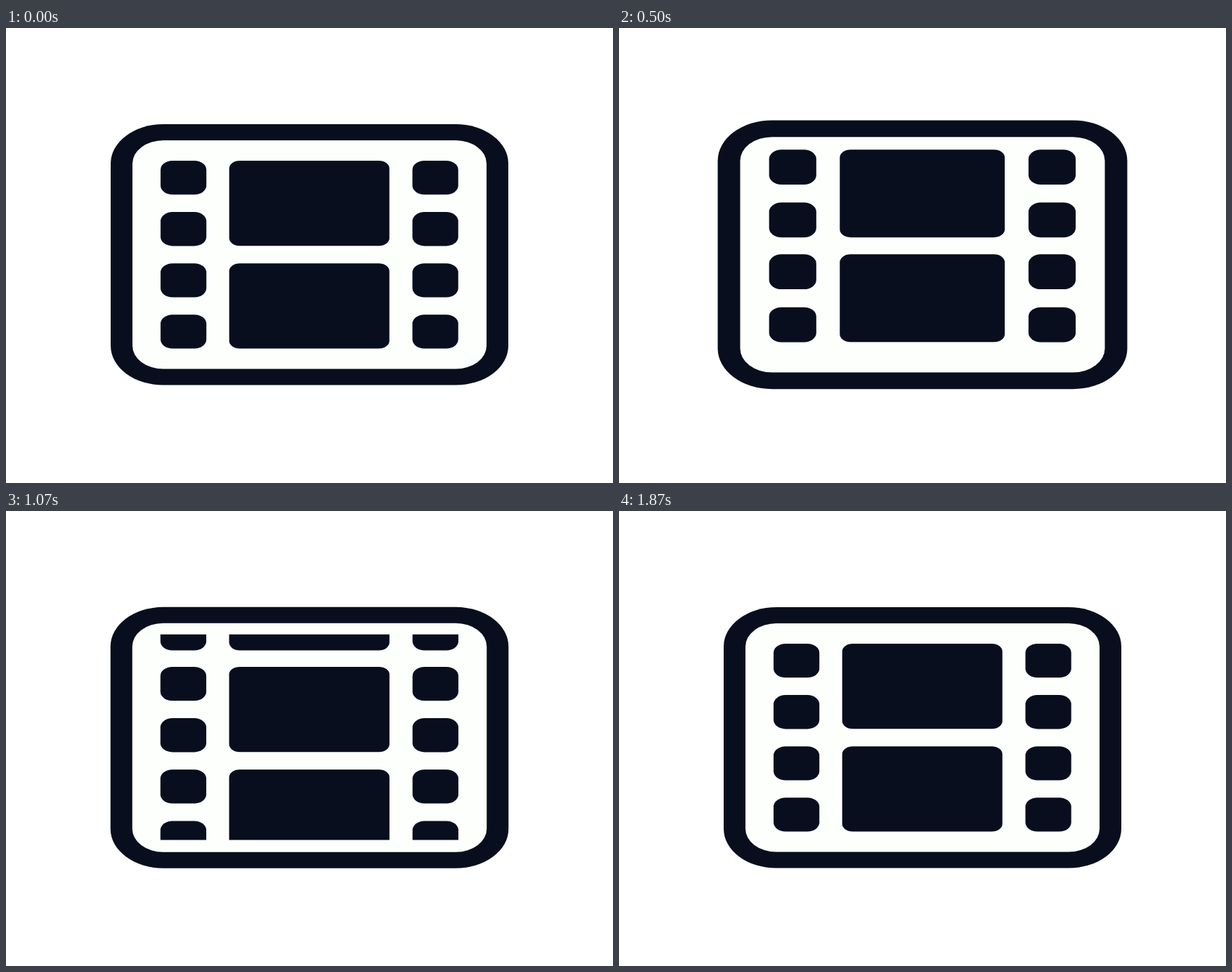
These frames come from a looping animation (864x648 px, 1.91 s). An HTML page:

```html
<!DOCTYPE html>
<html lang="en">
<head>
<meta charset="utf-8">
<title>Film strip</title>
<style>
  html, body { margin: 0; width: 100%; height: 100%; overflow: hidden; background: #fff; }
  svg { display: block; width: 100%; height: 100%; }
</style>
</head>
<body>
<svg viewBox="0 0 864 648" fill="#080e1d">
  <clipPath id="gate"><rect x="180" y="176" width="504" height="292.3"/></clipPath>
  <g id="icon">
    <rect x="149" y="137" width="566" height="371.6" rx="75" ry="56"/>
    <rect x="180" y="160" width="504" height="325.6" rx="44" ry="33" fill="#fdfffc"/>
    <g clip-path="url(#gate)"><g id="strip"></g></g>
  </g>
</svg>
<script>
const LOOP = 1910, STEP = 100 / 3;
const PITCH = 146.2;  // from one picture to the next inside a block
const BLOCK = 291;    // two pictures; blocks sit slightly closer together
const icon = document.getElementById("icon");
const strip = document.getElementById("strip");

// Keyframes: [step of 1/30 s, value]
const scaleKeys = [[2, 1], [7, 0.96], [11, 0.987], [18, 1.053], [20, 1.0565],
  [23, 1.061], [26, 1.053], [32, 1.001], [36, 1]];
const rollKeys = [[2, 0], [11, 78.8], [20, 221.2], [26, 363.2], [32, 615],
  [44, 826], [50, 862], [56, 3 * BLOCK]];

function addRect(x, y, width, height, rx, ry) {
  const rect = document.createElementNS("http://www.w3.org/2000/svg", "rect");
  const attrs = { x, y, width, height, rx, ry };
  for (const name in attrs) rect.setAttribute(name, attrs[name]);
  strip.append(rect);
}

for (const blockTop of [189 - BLOCK, 189]) {
  for (const top of [blockTop, blockTop + PITCH]) {
    addRect(317.7, top, 228, 121.3, 15, 11);
    for (const y of [top, top + PITCH / 2])
      for (const x of [220, 578.5]) addRect(x, y, 65.2, 48.3, 17, 13);
  }
}

// Smooth curve through the keys, flat at the ends and at turning points
function curve(keys, n) {
  const last = keys.length - 1;
  if (n <= keys[0][0]) return keys[0][1];
  if (n >= keys[last][0]) return keys[last][1];
  const slope = i => (keys[i + 1][1] - keys[i][1]) / (keys[i + 1][0] - keys[i][0]);
  const tangent = i => {
    if (i === 0 || i === last) return 0;
    const a = slope(i - 1), b = slope(i);
    return a * b > 0 ? 2 * a * b / (a + b) : 0;
  };
  const i = keys.findIndex(key => key[0] > n) - 1;
  const [t0, v0] = keys[i], [t1, v1] = keys[i + 1];
  const d = t1 - t0, u = (n - t0) / d, w = 1 - u;
  return v0 * w * w * (1 + 2 * u) + v1 * u * u * (3 - 2 * u)
    + d * u * w * (w * tangent(i) - u * tangent(i + 1));
}

function draw(now) {
  const n = Math.floor((now % LOOP + 3.5) / STEP);
  const scale = curve(scaleKeys, n);
  const roll = curve(rollKeys, n) % BLOCK;
  icon.setAttribute("transform",
    `translate(432 322.6) scale(${scale}) translate(-432 -322.6)`);
  strip.setAttribute("transform", `translate(0 ${roll})`);
}

const start = performance.now();
function tick() {
  draw(performance.now() - start);
  requestAnimationFrame(tick);
}
tick();
</script>
</body>
</html>
```
